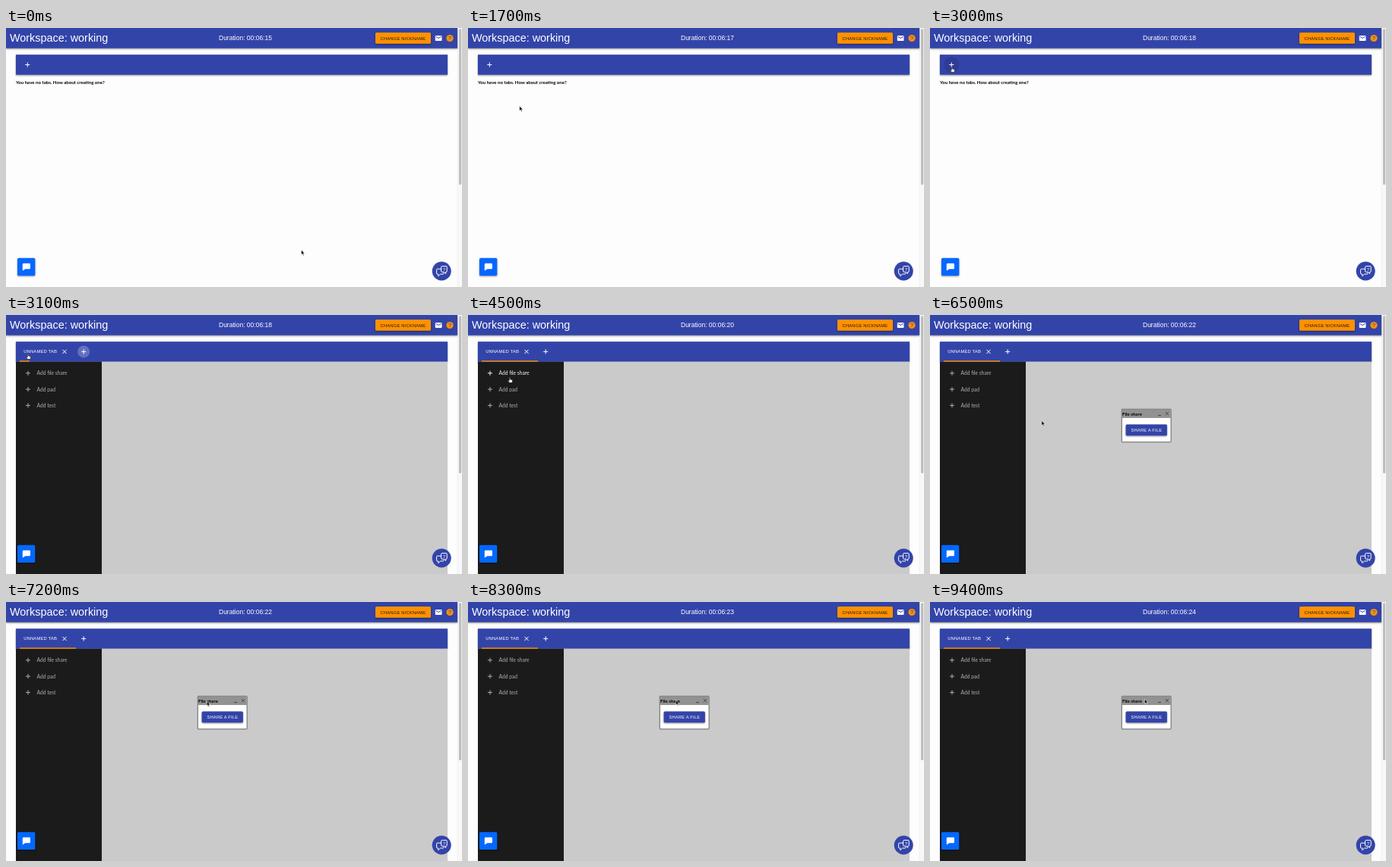
An HTML page for the animation above (9.5 s loop, 600 by 342 pixels).

```html
<!DOCTYPE html>
<html lang="en">
<head>
<meta charset="utf-8">
<title>Workspace</title>
<style>
  html, body { margin: 0; width: 100%; height: 100%; overflow: hidden; background: #fdfdfd; }
  svg { display: block; width: 600px; height: 342px; }
  text { font-family: "Liberation Sans", Arial, sans-serif; fill: #fff; white-space: pre; }
  .geo { font-family: Lato, sans-serif; font-size: 6.7px; }
  .bold { font-weight: 700; font-size: 6.1px; fill: #000; }
  .caps { font-size: 5.85px; letter-spacing: .028em; }
  .blue { fill: #3344a9; }
  .orange { fill: #ff9100; }
  .line { fill: none; stroke: #fff; stroke-width: 1; }
  .item { opacity: .64; }
  .item.lit { opacity: .95; }
  .shade { filter: drop-shadow(0 1px 1.3px rgba(0, 0, 0, .45)); }
</style>
</head>
<body>
<svg viewBox="0 0 600 342">
  <defs>
    <path id="plus" class="line" d="M-3 0H3M0-3V3"/>
    <path id="cross" class="line" d="M-2.6-2.6 2.6 2.6M2.6-2.6-2.6 2.6"/>
  </defs>

  <rect width="600" height="342" fill="#fdfdfd"/>
  <rect x="594" width="6" height="342" fill="#f8f8f8"/>
  <rect x="593.8" width=".5" height="342" fill="#e6e6e6"/>
  <rect id="thumb" x="596" y="1" width="3.2" height="206" rx="1.6" fill="#bdbdbd"/>

  <g class="shade"><rect class="blue" width="594" height="26.7"/></g>
  <text x="5" y="18.4" font-size="14.4">Workspace: working</text>
  <text id="clock" x="280" y="16.2" font-size="8.5"></text>
  <rect class="orange shade" x="486" y="6" width="73" height="14.7" rx="1.5"/>
  <text class="caps" x="492.5" y="15.6" style="fill:#1e1a10">CHANGE NICKNAME</text>
  <rect x="564.8" y="9.9" width="8.7" height="7.1" rx=".8" fill="#fff"/>
  <path class="blue" d="M565.6 10.8 569.15 13 572.7 10.8V11.7L569.15 13.9 565.6 11.7Z"/>
  <circle class="orange" cx="584" cy="13.5" r="4.6"/>
  <text x="584" y="16.2" font-size="7.4" text-anchor="middle" style="fill:#3344a9">?</text>

  <g class="shade"><rect class="blue" x="13" y="35.2" width="568" height="26.5"/></g>

  <g id="empty">
    <circle id="hover" cx="28.3" cy="48.5" r="10.5" fill="rgba(0,0,0,.1)"/>
    <use href="#plus" x="28.3" y="48.5"/>
    <text class="geo bold" x="13" y="74">You have no tabs. How about creating one?</text>
  </g>

  <g id="tab">
    <rect x="13" y="61.7" width="113" height="281" fill="#1b1b1b"/>
    <rect x="126" y="61.7" width="455" height="281" fill="#cacaca"/>
    <text class="caps" x="23.2" y="50">UNNAMED TAB</text>
    <use href="#cross" x="77" y="48.4"/>
    <circle id="ripple" cx="102.2" cy="48.4" r="8" fill="#fff"/>
    <use href="#plus" x="102.2" y="48.4"/>
    <rect id="mark" class="orange" x="18" y="60.3" height="1.4"/>
    <g id="list"></g>
    <g id="panel">
      <rect x="252.3" y="124.3" width="64.8" height="43.5" rx=".6" fill="#fff" stroke="#444" stroke-width=".8"/>
      <rect x="252.7" y="124.7" width="64" height="11.3" fill="#929292"/>
      <text class="geo bold" x="253" y="132.7">File share</text>
      <path d="M300 132.6H304" stroke="#222" stroke-width=".7"/>
      <path d="M309.8 128 314 132.2M314 128 309.8 132.2" stroke="#333" stroke-width=".7"/>
      <rect class="blue shade" x="257.6" y="144.6" width="54.3" height="14.6" rx="1.5"/>
      <text class="caps" x="264.4" y="154">SHARE A FILE</text>
    </g>
  </g>

  <g class="shade"><rect x="15" y="303.7" width="23.3" height="23.3" rx="1.6" fill="#0468ff"/></g>
  <path d="M23.2 310.8H30.8Q32 310.8 32 312V317Q32 318.2 30.8 318.2H25.5L21.8 320.6V312Q21.8 310.8 23.2 310.8Z" fill="#fff"/>

  <circle class="blue" cx="573.2" cy="321" r="12.5"/>
  <g class="line" stroke-width=".9">
    <path d="M573 318.2H567.6Q566.6 318.2 566.6 319.2V324Q566.6 325 567.6 325H568.8V327.6L571.6 325H575Q576 325 576 324V323.2"/>
    <path class="blue" d="M573.6 314.6H579.2Q580.2 314.6 580.2 315.6V321.2Q580.2 322.2 579.2 322.2H578.6V324.4L576.2 322.2H573.6Q572.6 322.2 572.6 321.2V315.6Q572.6 314.6 573.6 314.6Z"/>
  </g>
  <text x="576.4" y="320.6" font-size="6" text-anchor="middle">?</text>

  <path id="arrow" d="M0 0V6.4L1.5 5.1 2.5 7.4 3.6 6.9 2.6 4.7H4.6Z" fill="#000" stroke="#fff" stroke-width=".6"/>
  <path id="hand" d="M-.7.6Q0-.4.7.6V2.6L3 3.1Q3.8 3.3 3.7 4.2L3 6.9H-.4L-2.4 4.4Q-2.3 3.4-1.4 3.8L-.7 4.3Z" fill="#fff" stroke="#000" stroke-width=".6"/>
</svg>
<script>
const LOOP = 9500, STEP = 100;
const $ = id => document.getElementById(id);
const show = (id, on) => { $(id).style.display = on ? '' : 'none'; };
const clamp = v => Math.min(1, Math.max(0, v));
const ease = p => p * p * (3 - 2 * p);

// Moments at which the seconds counter advances
const ticks = [1000, 1700, 2500, 3500, 4500, 5500, 6500, 7500, 8500];

// Pointer stops: time, x, y
const path = [
  [0, 388.5, 293], [200, 386.5, 293], [900, 386.5, 293], [1200, 152.5, 214.5],
  [1300, 152.5, 214.5], [1500, 70, 106], [1600, 70, 106], [2300, 29, 51.5],
  [3800, 29, 51.5], [4400, 55, 82.5], [4900, 55, 82.5], [5300, 57.5, 146],
  [6000, 57.5, 146], [7100, 264.3, 131], [7300, 264.3, 131], [9300, 282.3, 128]
];

const items = ['Add file share', 'Add pad', 'Add test', 'File share'];
$('list').innerHTML = items.map((name, i) => {
  const y = 76.8 + i * 21.3;
  return `<g class="item" id="item${i}"><use href="#${i < 3 ? 'plus' : 'cross'}" x="29" y="${y}"/>` +
    `<text class="geo" x="40.5" y="${y + 2.4}">${name}</text></g>`;
}).join('');

function pointer(t) {
  const n = path.findIndex(p => p[0] > t);
  if (n < 0) return path[path.length - 1].slice(1);
  const [t0, x0, y0] = path[n - 1], [t1, x1, y1] = path[n];
  const p = ease((t - t0) / (t1 - t0));
  return [x0 + (x1 - x0) * p, y0 + (y1 - y0) * p];
}

function draw(t) {
  const open = t >= 3100, shared = t >= 6000;
  const [x, y] = pointer(t);
  $('clock').textContent = 'Duration: 00:06:' + (15 + ticks.filter(k => k <= t).length);
  show('empty', !open);
  show('tab', open);
  show('hover', t >= 2200);
  show('panel', shared);
  show('item3', t >= 5000 && !shared);
  $('thumb').setAttribute('height', open ? 208 : 206);
  $('mark').setAttribute('width', 74 * ease(clamp((t - 3020) / 300)));
  $('ripple').setAttribute('opacity', .24 * (1 - clamp((t - 3150) / 400)));
  $('item0').classList.toggle('lit', t >= 4200 && t < 5700);
  $('item3').classList.toggle('lit', t >= 5200);

  const hand = t >= 2200 && t < 6300;
  show('hand', hand);
  show('arrow', !hand);
  $(hand ? 'hand' : 'arrow').setAttribute('transform', `translate(${x} ${y})`);
}

const start = performance.now();
function frame() {
  const t = (performance.now() - start) % LOOP;
  draw(Math.floor(t / STEP) * STEP);
  requestAnimationFrame(frame);
}
frame();
</script>
</body>
</html>
```
